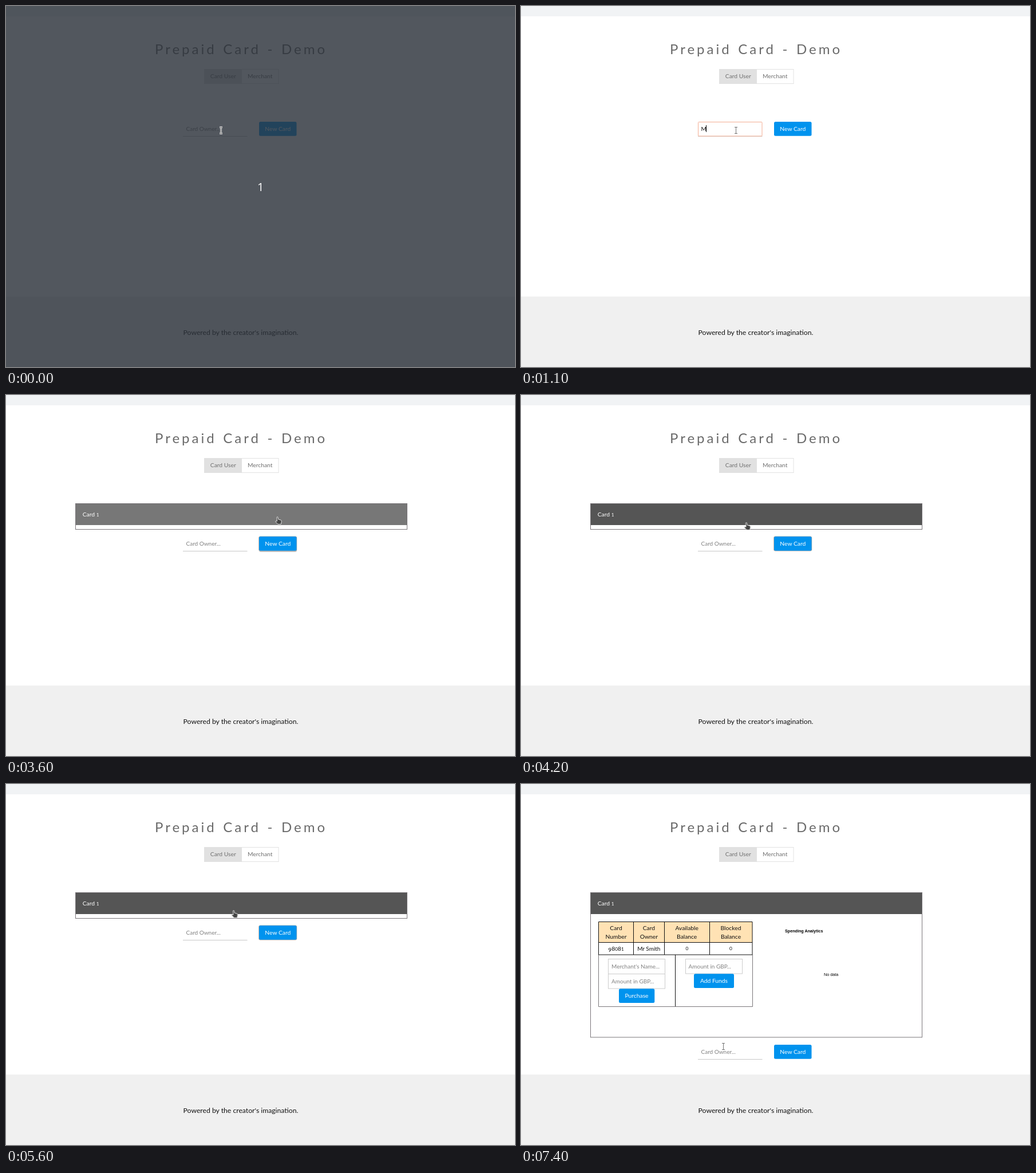
Animation, 889 px wide and 630 px high, one loop 8 s. Source, as an HTML page:

```html
<!DOCTYPE html>
<html lang="en">
<head>
<meta charset="utf-8">
<title>Prepaid Card Demo</title>
<style>
html, body { margin: 0; width: 100%; height: 100%; overflow: hidden; background: #fff; }
svg { display: block; width: 889px; height: 630px; }
svg * {
  animation-duration: 8s;
  animation-timing-function: step-end;
  animation-iteration-count: infinite;
}
text { font: 10.3px Lato, sans-serif; fill: #111; white-space: pre; }
.mid { text-anchor: middle; }
.title { font-size: 24px; letter-spacing: 4px; word-spacing: 1.4px; fill: #6a6a6a; }
.footer { font-size: 12.2px; }
.count { font: 20px "Open Sans", sans-serif; }
.tab { fill: #707070; }
.hint { font-size: 10px; fill: #808080; }
.entry { font-size: 10px; }
.light { fill: #fff; }
.chart { font: 7.2px "Liberation Sans", Arial, sans-serif; fill: #000; }
.bold { font-weight: 700; }
.small { font-size: 8.3px; }
.blue { fill: #0093ee; }
.field { fill: #fff; stroke: #ccc; }
.grid { fill: none; stroke: #111; }
.frame { fill: none; stroke: #7b777b; }

/* page state */
.intro { animation-name: intro; }
.focus { animation-name: focus; }
.typed { animation-name: typed; }
.placeholder { animation-name: placeholder; }
.caret { animation-name: caret; }
.form { animation-name: form; }
.hover { animation-name: hover; }
.ring { animation-name: ring; }
.card { animation-name: card; }
.head { animation-name: head; }
.closed { animation-name: closed; }
.open { animation-name: open; }

@keyframes intro { 0% { opacity: 1 } 1.25% { opacity: 0 } }
@keyframes focus { 0% { opacity: 0 } 1.25% { opacity: 1 } 43.75% { opacity: 0 } }
@keyframes typed { 0% { opacity: 0 } 13.75% { opacity: 1 } 45% { opacity: 0 } }
@keyframes placeholder { 0% { opacity: 1 } 13.75% { opacity: 0 } 45% { opacity: 1 } }
@keyframes caret {
  0% { transform: translateX(314px) }
  13.75% { transform: translateX(323px) }
  16.25% { transform: translateX(329px) }
  20% { transform: translateX(334px) }
  23.75% { transform: translateX(346px) }
  27.5% { transform: translateX(349px) }
  37.5% { transform: translateX(355px) }
}
@keyframes form {
  0% { transform: none }
  45% { transform: translateY(45px) }
  72.5% { transform: translateY(253px) }
}
@keyframes hover { 0% { opacity: 0 } 41.25% { opacity: 1 } 52.5% { opacity: 0 } }
@keyframes ring { 0% { opacity: 0 } 43.75% { opacity: 1 } 72.5% { opacity: 0 } }
@keyframes card { 0% { opacity: 0 } 45% { opacity: 1 } }
@keyframes head {
  0% { fill: #777 }
  52.5% { fill: #555 }
  63.75% { fill: #777 }
  70% { fill: #555 }
}
@keyframes closed { 0% { opacity: 1 } 72.5% { opacity: 0 } }
@keyframes open { 0% { opacity: 0 } 72.5% { opacity: 1 } }

/* pointer */
.pointer { animation-name: move; }
.beam { animation-name: beam; }
.arrow { animation-name: arrow; }
.hand { animation-name: hand; }

@keyframes move {
  0% { transform: translate(375px, 217px) }
  37.5% { transform: translate(394px, 216px) }
  38.75% { transform: translate(431px, 217px) }
  41.25% { transform: translate(470px, 212px) }
  52.5% { transform: translate(389.5px, 222px) }
  53.75% { transform: translate(404px, 212px) }
  56.25% { transform: translate(395px, 217px) }
  63.75% { transform: translate(397px, 253px) }
  67.5% { transform: translate(393px, 238px) }
  70% { transform: translate(393.5px, 220px) }
  72.5% { transform: translate(393.5px, 219px) }
  75% { transform: translate(398px, 230px) }
  76.25% { transform: translate(400px, 243px) }
  78.75% { transform: translate(400px, 271px) }
  82.5% { transform: translate(398px, 384px) }
  85% { transform: translate(375px, 436px) }
  87.5% { transform: translate(362px, 451px) }
  90% { transform: translate(354px, 458px) }
  92.5% { transform: translate(353px, 458px) }
}
@keyframes beam {
  0% { opacity: 1 } 38.75% { opacity: 0 }
  63.75% { opacity: 1 } 67.5% { opacity: 0 }
  90% { opacity: 1 }
}
@keyframes arrow {
  0% { opacity: 0 } 38.75% { opacity: 1 } 41.25% { opacity: 0 }
  67.5% { opacity: 1 } 70% { opacity: 0 }
  75% { opacity: 1 } 90% { opacity: 0 }
}
@keyframes hand {
  0% { opacity: 0 } 41.25% { opacity: 1 } 63.75% { opacity: 0 }
  70% { opacity: 1 } 75% { opacity: 0 }
}
</style>
</head>
<body>
<svg viewBox="0 0 889 630">
  <rect width="889" height="630" fill="#fff"/>
  <rect width="889" height="18" fill="#f1f3f5"/>
  <rect y="507" width="889" height="123" fill="#f0f0f0"/>
  <text class="title" x="260" y="84">Prepaid Card - Demo</text>

  <rect x="346.5" y="110.5" width="129.5" height="25" fill="#fff" stroke="#e2e2e2"/>
  <rect x="346" y="110" width="66" height="25.5" fill="#e1e1e1"/>
  <text class="tab mid" x="379.3" y="126.2">Card User</text>
  <text class="tab mid" x="443.7" y="126.2">Merchant</text>

  <text class="footer" x="309.6" y="573.5">Powered by the creator's imagination.</text>

  <g class="card">
    <rect class="head" x="122" y="189.5" width="578" height="37.5"/>
    <text class="light" x="133.7" y="212">Card <tspan class="small">1</tspan></text>
    <rect class="frame closed" x="121.5" y="189.5" width="579" height="45"/>
    <g class="open">
      <rect class="frame" x="121.5" y="189.5" width="579" height="252.5"/>
      <rect x="135.5" y="240.5" width="268.5" height="36" fill="#ffe2b4"/>
      <path class="frame" d="M135.5 298V388.5H404.5V298"/>
      <path class="grid" d="M135.5 240.5H404V298H135.5ZM135.5 276.5H404M196.5 240.5V298M250.5 240.5V298M329.5 240.5V298M269.5 298V388"/>

      <g class="mid">
        <text x="166" y="255">Card</text><text x="166" y="269.5">Number</text>
        <text x="223.3" y="255">Card</text><text x="223.3" y="269.5">Owner</text>
        <text x="289.7" y="255">Available</text><text x="289.7" y="269.5">Balance</text>
        <text x="366.5" y="255">Blocked</text><text x="366.5" y="269.5">Balance</text>
        <text x="166" y="290.5"><tspan dy="2">9</tspan><tspan dy="-2">8</tspan><tspan class="small">0</tspan>8<tspan class="small">1</tspan></text>
        <text class="entry" x="223.3" y="290.5">Mr Smith</text>
        <text class="small" x="290" y="290.3">0</text>
        <text class="small" x="366.5" y="290.3">0</text>
      </g>

      <rect class="field" x="152.5" y="305.5" width="99" height="26"/>
      <rect class="field" x="152.5" y="331.5" width="99" height="25.5"/>
      <rect class="field" x="287.5" y="305.5" width="99" height="25.5"/>
      <text class="hint" x="158" y="321.8">Merchant's Name...</text>
      <text class="hint" x="158" y="347.8">Amount in GBP...</text>
      <text class="hint" x="292.5" y="321.8">Amount in GBP...</text>
      <rect class="blue" x="171" y="357.3" width="62.3" height="24.7" rx="2.5"/>
      <text class="light mid" x="202" y="373">Purchase</text>
      <rect class="blue" x="302" y="331.3" width="70" height="24.7" rx="2.5"/>
      <text class="light mid" x="337" y="347">Add Funds</text>

      <text class="chart bold" x="461" y="258.5">Spending Analytics</text>
      <text class="chart" x="529" y="334.5">No data</text>
    </g>
  </g>

  <g class="form">
    <path d="M309 227.5H421.5" stroke="#c8c8c8"/>
    <text class="hint placeholder" x="314.5" y="217.8">Card Owner...</text>
    <g class="typed">
      <text class="entry" x="314.5" y="217.8">Mr Smith</text>
      <g class="caret"><rect x="1" y="206" width="46" height="17" fill="#fff"/></g>
    </g>
    <g class="focus">
      <rect x="309.5" y="202.5" width="111.5" height="24.5" rx="1" fill="none" stroke="#f4ad93"/>
      <g class="caret"><rect y="208" width="1" height="12" fill="#111"/></g>
    </g>
    <rect class="hover" x="442" y="204" width="66" height="25" rx="3" fill="#000" fill-opacity=".22"/>
    <rect class="ring" x="441.2" y="201.5" width="67" height="26" rx="3" fill="#b9aaa0"/>
    <rect class="blue" x="442" y="202" width="65.5" height="24.7" rx="2.5"/>
    <text class="light mid" x="474.8" y="217.8">New Card</text>
  </g>

  <g class="intro">
    <rect width="889" height="630" fill="#2b3139" fill-opacity=".81"/>
    <text class="light mid count" x="444.7" y="322.5">1</text>
  </g>

  <g class="pointer">
    <g class="beam" fill="none">
      <path d="M-2 -5.5H3M.5 -5.5V5.5M-2 5.5H3" stroke="#fff" stroke-width="2.4"/>
      <path d="M-2 -5.5H3M.5 -5.5V5.5M-2 5.5H3" stroke="#666" stroke-width=".9"/>
    </g>
    <path class="arrow" d="M.5 .7V11.2L3.2 8.8 5 12.7 6.8 11.9 5.2 8.1H8.8Z" fill="#444" stroke="#fff" stroke-width=".8"/>
    <path class="hand" d="M3 1.2Q4 0 5 1.2L5.6 5 10 6.2Q11.6 6.8 11.2 9L10.3 13.4H4.8L.6 9Q.8 7 3.4 8.2Z" fill="#444" stroke="#fff" stroke-width=".8"/>
  </g>
</svg>
</body>
</html>
```
